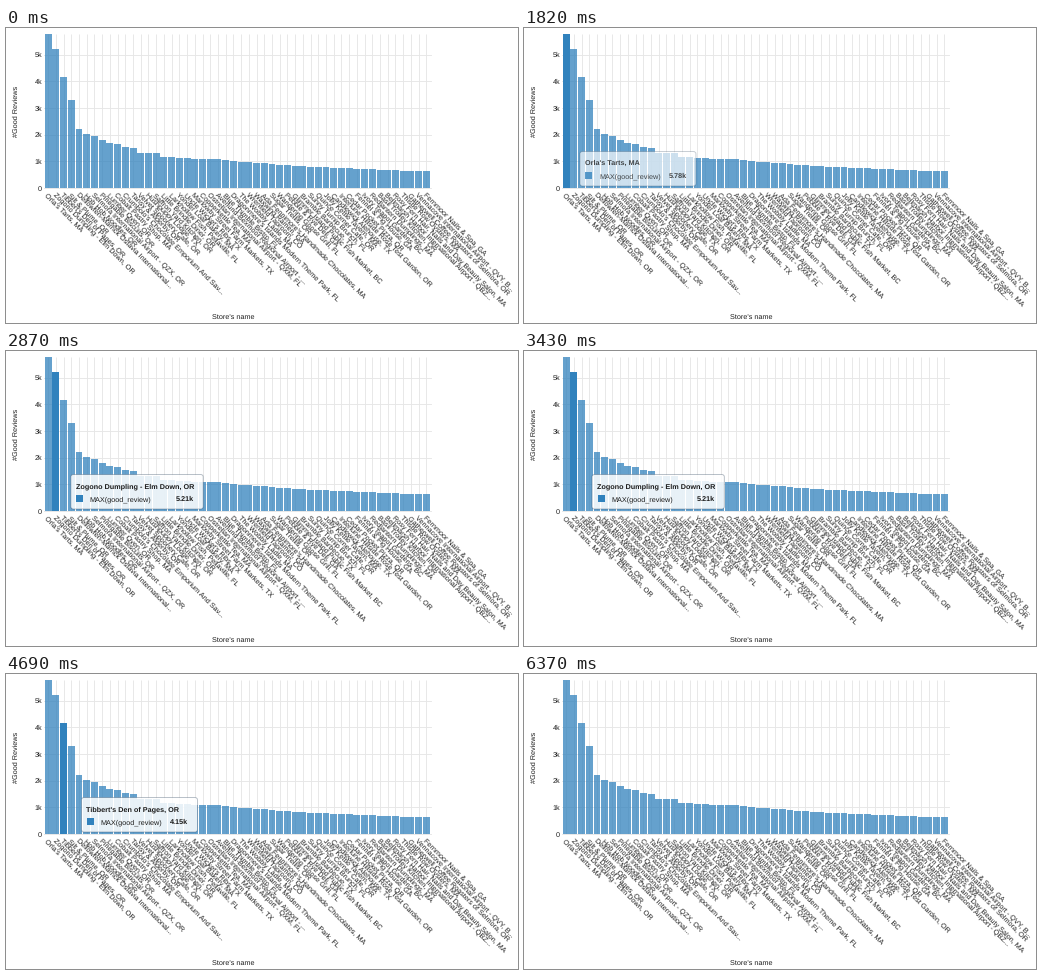
Animation of 512x295 px, one loop 6650 ms. Source, as a matplotlib script:

```python
import matplotlib.pyplot as plt
import numpy as np
from matplotlib.animation import FuncAnimation
from matplotlib.patches import FancyBboxPatch, Rectangle

W, H, DPI = 512, 295, 100
STEP_MS, LOOP_MS = 70, 6650
LEFT, RIGHT, TOP, BASE = 37.9, 424.6, 6, 160
PX_PER_K = 26.65
BLUE = np.array([0x31, 0x82, 0xBD]) / 255
INK = "#1c1c1c"
GRID = "#e6e6e6"

plt.rcParams["font.family"] = "Liberation Sans"
plt.rcParams["text.hinting"] = "none"

VALUES = [
    5.78, 5.21, 4.15, 3.32, 2.21, 2.01, 1.96, 1.81, 1.70, 1.66,
    1.55, 1.51, 1.32, 1.32, 1.30, 1.18, 1.18, 1.13, 1.11, 1.10,
    1.10, 1.09, 1.08, 1.06, 1.02, 0.98, 0.97, 0.94, 0.93, 0.91,
    0.87, 0.85, 0.84, 0.81, 0.80, 0.79, 0.78, 0.76, 0.75, 0.74,
    0.73, 0.72, 0.70, 0.69, 0.69, 0.66, 0.65, 0.65, 0.64, 0.63,
]

STORES = """Orla's Tarts, MA
Zogono Dumpling - Elm Down, OR
Tibbert's Den of Pages, OR
Silt & Plume, OR
Dellowfen-Marrick Ostavia International...
Hob Hob Noodles, OR
Selmora International Airport - QZX, OR
Pinegable Biscuits, OR
Lumber Oven, OR
Cobalt Pastry Shop, MA
Crumbolo's Chocolate Emporium And Sav...
Tansy & Alderby, OR
Velvet Spoonery Cafe, OR
Hushpuppy Lodge, TX
Saffron Yard Kitchen, OR
Little Brindle Diner, OR
Larkhollow Fish, Pellaville, FL
Yonder Loaf Bakery, MA
Uncle Wicket's Ribs, TX
Marlowby Street Farm Markets, TX
Copperkettle Tea, MA
Ostrellan International Airport - QXM, FL
Averlund-Bexmoor Regional Airport - ...
Blue Thimble Bistro, FL
Dragonmere's Islands Modern Theme Park, FL
The Wobbly Ladle, MA
Wrenfield Taproom, CO
Waxwing Ramen, GA
Ada Fennimore's Handmade Chocolates, MA
Sugar Trellis, OR
Wandering Goose Grill, FL
Pebble & Rye Deli, GA
Glimmer Island Public Fish Market, BC
Bramble Barbecue, TX
Sunny Turnip Brunch, FL
Quince Corner Cafe, OR
Jolly Kettle Tavern, MA
Candlewick Alehouse, TX
Interlune Hillside Rose Test Garden, OR
Cedar Pocket Pizza, OR
Fennel & Fig House, GA
Ivory Teapot Gardens, BC
Redlantern Dumplings, MA
Basil Trolley Kitchen, OR
Bellmarsh Harbor International Airport - QBZ...
Rosy Fern Hair, Nails and Day Beauty Salon, MA
Thistle Row Oysters, MA
Gatherwell Coffee Roasters of Selmora, OR
Vennacove International Airport - QVY, B...
Fernmoor Nails & Spa, GA""".split("\n")

# Hovered bar changes at these times; the last one is the pointer leaving.
HOVER_MS = [1490, 2440, 3620, 4740, 5480]
BAR_FADE = 250
TIP_FADE_IN = (1490, 1960)
TIP_FADE_OUT = (5560, 6020)
TIP_TIMES = [1490, 2170, 2380, 2520, 3010, 3430, 3710, 3850, 3920, 4550, 4690, 5040]
TIP_LEFTS = [54, 58, 58, 62, 66, 68, 70, 71, 72, 72, 75.5, 79]
TIP_TOP, TIP_HEIGHT, TIP_MIN_WIDTH = 123.5, 34.5, 116

fig = plt.figure(figsize=(W / DPI, H / DPI), dpi=DPI, facecolor="white")
ax = fig.add_axes([0, 0, 1, 1])
ax.set_xlim(0, W)
ax.set_ylim(H, 0)
ax.axis("off")


def pt(px):
    return px * 72 / DPI


def label(x, y, text, size=7.3, **style):
    style = {"va": "baseline", "color": INK, **style}
    return ax.text(x, y, text, fontsize=pt(size), **style)


def ease(t, start, end):
    u = np.clip((t - start) / (end - start), 0, 1)
    return u * u * (3 - 2 * u)


def draw_chart():
    step = (RIGHT - LEFT) / (len(VALUES) + 0.1)
    centers = LEFT + step * (0.55 + np.arange(len(VALUES)))
    line = dict(color=GRID, lw=pt(0.9), zorder=1)
    ax.vlines(centers, TOP, BASE, **line)
    for k in range(6):
        y = BASE - k * PX_PER_K
        ax.plot([LEFT, RIGHT], [y, y], **line)
        label(36, y + 2.6, f"{k}k" if k else "0", ha="right")

    bars = []
    for x, value, store in zip(centers, VALUES, STORES):
        height = value * PX_PER_K
        bar = Rectangle((x - 0.45 * step, BASE - height), 0.9 * step, height,
                        fc=(*BLUE, 0.75), lw=0, zorder=2)
        bars.append(ax.add_patch(bar))
        label(x - 3.3, 167.2, store, rotation=-45, rotation_mode="anchor", zorder=3)

    label(11.5, 83.5, "#Good Reviews", rotation=90, rotation_mode="anchor", ha="center")
    label(227.5, 291, "Store's name", ha="center")
    return bars


class Tooltip:
    def __init__(self):
        self.box = FancyBboxPatch((0, TIP_TOP), TIP_MIN_WIDTH, TIP_HEIGHT,
                                  boxstyle="round,pad=0,rounding_size=2.5",
                                  lw=pt(1), zorder=5)
        self.swatch = Rectangle((0, 144), 7, 7, fc=BLUE, lw=0, zorder=6)
        ax.add_patch(self.box)
        ax.add_patch(self.swatch)
        self.title = label(0, 137.2, "", weight="bold", zorder=6)
        self.metric = label(0, 150.2, "MAX(good_review)", zorder=6)
        self.value = label(0, 150.2, "", weight="bold", ha="right", zorder=6)

    def update(self, left, index, alpha):
        self.title.set_text(STORES[index])
        self.value.set_text(f"{VALUES[index]:.2f}k")
        width = max(TIP_MIN_WIDTH, self.title.get_window_extent().width + 14)
        self.box.set_bounds(left, TIP_TOP, width, TIP_HEIGHT)
        self.box.set_facecolor((1, 1, 1, 0.86 * alpha))
        self.box.set_edgecolor((0.1, 0.2, 0.3, 0.3 * alpha))
        self.title.set_x(left + 4.7)
        self.swatch.set_x(left + 5.5)
        self.metric.set_x(left + 19)
        self.value.set_x(left + width - 9)
        for part in (self.title, self.swatch, self.metric, self.value):
            part.set_alpha(alpha)


bars = draw_chart()
tip = Tooltip()


def update(frame):
    t = frame * STEP_MS
    for bar, on, off in zip(bars, HOVER_MS, HOVER_MS[1:]):
        level = ease(t, on, on + BAR_FADE) - ease(t, off, off + BAR_FADE)
        bar.set_facecolor((*BLUE, 0.75 + 0.25 * level))
    index = sum(t >= start for start in HOVER_MS[1:-1])
    alpha = ease(t, *TIP_FADE_IN) - ease(t, *TIP_FADE_OUT)
    tip.update(np.interp(t, TIP_TIMES, TIP_LEFTS), index, alpha)
    return []


anim = FuncAnimation(fig, update, frames=LOOP_MS // STEP_MS, interval=STEP_MS,
                     repeat=True, repeat_delay=0, blit=False)
plt.show()
```
